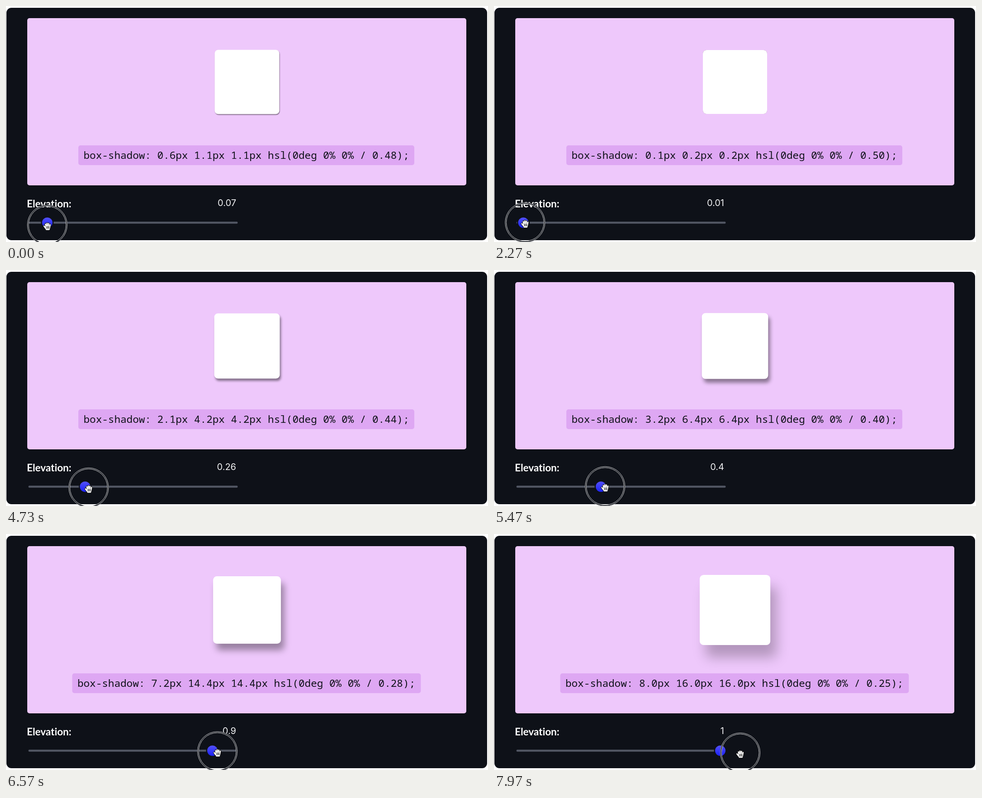
Write an HTML page that moves like this. It is 1066 by 525 pixels and loops after 8 s.

```html
<!DOCTYPE html>
<html lang="en">
<head>
<meta charset="utf-8">
<title>Shadow elevation</title>
<style>
  html, body { margin: 0; width: 100%; height: 100%; overflow: hidden; background: #fff; }
  #stage { position: absolute; left: 0; top: 0; width: 1066px; height: 525px; overflow: hidden; }
  #stage > * { position: absolute; }
  .window { left: 1px; top: 4px; width: 1063px; height: 517px; border-radius: 11px; background: #0e1118; }
  .preview { left: 46.5px; top: 27px; width: 971.5px; height: 372px; border-radius: 5px; background: #eec8fb; }
  #card { left: 461.5px; top: 97.5px; width: 141.5px; height: 141.5px; border-radius: 8px; background: #fff; }
  #code {
    left: 531.5px; top: 310px; height: 44px; padding: 0 12px; transform: translateX(-50%);
    border-radius: 5px; background: #dea7f3; color: #0e1118; white-space: pre;
    font: 500 22.65px/43px "Noto Sans Mono", monospace;
  }
  .label {
    left: 46px; top: 424.5px; color: #fff;
    font: 700 22.5px/29px Lato, sans-serif; font-variant-ligatures: none;
  }
  #value { right: 557px; top: 424px; color: #f2f3f5; font: 20px/28px Inter, sans-serif; }
  svg { left: 0; top: 0; }
</style>
</head>
<body>
<div id="stage">
  <div class="window"></div>
  <div class="preview"></div>
  <div id="card"></div>
  <div id="code"></div>
  <div class="label">Elevation:</div>
  <div id="value"></div>
  <svg width="1066" height="525">
    <defs>
      <linearGradient id="blue" x2="0" y2="1">
        <stop offset="0" stop-color="#5350fb"/>
        <stop offset="1" stop-color="#1b22f5"/>
      </linearGradient>
      <path id="hand" d="M-3.8 -4.6L-2.6 2 M-.6 -6.4L-.2 2 M2.8 -5.8L2.4 2 M6.2 -3.4L5 3
        M-7 -.2L-4 4 M-3.5 2H5L4 7H-2Z"/>
    </defs>
    <rect x="49.5" y="479.8" width="463" height="4.4" rx="2.2" fill="#515663"/>
    <g id="thumb">
      <circle r="14" fill="#0e1118"/>
      <circle r="11.5" fill="url(#blue)"/>
    </g>
    <g id="cursor" fill="none">
      <circle r="43" stroke="#0e1118" stroke-width="3.4"/>
      <circle r="44" stroke="#fff" stroke-width=".8"/>
      <circle r="41.5" stroke="#fff" stroke-width=".8"/>
      <g transform="translate(0 3)" stroke-linecap="round" stroke-linejoin="round">
        <use href="#hand" stroke="#111" stroke-width="4.8"/>
        <use href="#hand" stroke="#fff" fill="#fff" stroke-width="2.8"/>
        <path stroke="#111" stroke-width="1.2" d="M-1.4 0V5 M1.2 0V5 M3.8 0V5"/>
      </g>
    </g>
  </svg>
</div>
<script>
const LOOP = 8000;
const $ = id => document.getElementById(id);

// Drag path as [time, position]; the pointer may run past either end of the slider.
const drag = [
  [0, .07], [900, -.04], [1500, -.04], [2270, .01], [3500, .1],
  [4730, .26], [5470, .4], [6300, .53], [6570, .9], [7970, 1.07]
];
const last = drag.length - 1;

const slope = i => (drag[i + 1][1] - drag[i][1]) / (drag[i + 1][0] - drag[i][0]);

// Harmonic-mean tangents keep the curve from overshooting its keys.
function tangent(i) {
  if (i === 0 || i === last) return 0;
  const a = slope(i - 1), b = slope(i);
  return a * b > 0 ? 2 * a * b / (a + b) : 0;
}

function dragAt(time) {
  if (time <= 0) return drag[0][1];
  if (time >= drag[last][0]) return drag[last][1];
  const i = drag.findIndex(key => key[0] > time) - 1;
  const [t0, from] = drag[i], [t1, to] = drag[i + 1];
  const span = t1 - t0, u = (time - t0) / span, v = 1 - u;
  return v * v * (1 + 2 * u) * from + u * u * (3 - 2 * u) * to
    + span * u * v * (v * tangent(i) - u * tangent(i + 1));
}

const elevationAt = time => Math.min(1, Math.max(0, dragAt(time)));

// The card follows the slider like a critically damped spring.
function springElevation(time) {
  let sum = 0, total = 0;
  for (let lag = 20; lag <= 1800; lag += 20) {
    const weight = lag * Math.exp(-lag / 200);
    sum += weight * elevationAt(time - lag);
    total += weight;
  }
  return sum / total;
}

const sliderX = position => 60.5 + 440 * position;
const px = n => (n + 1e-9).toFixed(1) + "px";
const alpha = e => .5 - .25 * e;
const place = (id, x, y) => $(id).setAttribute("transform", `translate(${x} ${y})`);

function draw(time) {
  const e = Math.round(elevationAt(time) * 100) / 100;
  const soft = springElevation(time), unit = 1.55 * soft;

  $("card").style.transform = `scale(${1 + .1 * soft})`;
  $("card").style.boxShadow =
    `${8 * unit}px ${16 * unit}px ${16 * unit}px rgba(0, 0, 0, ${alpha(soft)})`;

  $("code").textContent = `box-shadow: ${px(8 * e)} ${px(16 * e)} ${px(16 * e)} ` +
    `hsl(0deg 0% 0% / ${(alpha(e) + 1e-9).toFixed(2)});`;
  $("value").textContent = e;

  // The hand slowly drifts off the thumb and sways up and down.
  place("thumb", sliderX(e), 482);
  place("cursor", sliderX(dragAt(time)) + time / 600,
    484 + 3 * Math.cos(time / 3800 * 2 * Math.PI));
}

const start = performance.now();
function tick() {
  draw((performance.now() - start) % LOOP);
  requestAnimationFrame(tick);
}
tick();
</script>
</body>
</html>
```
